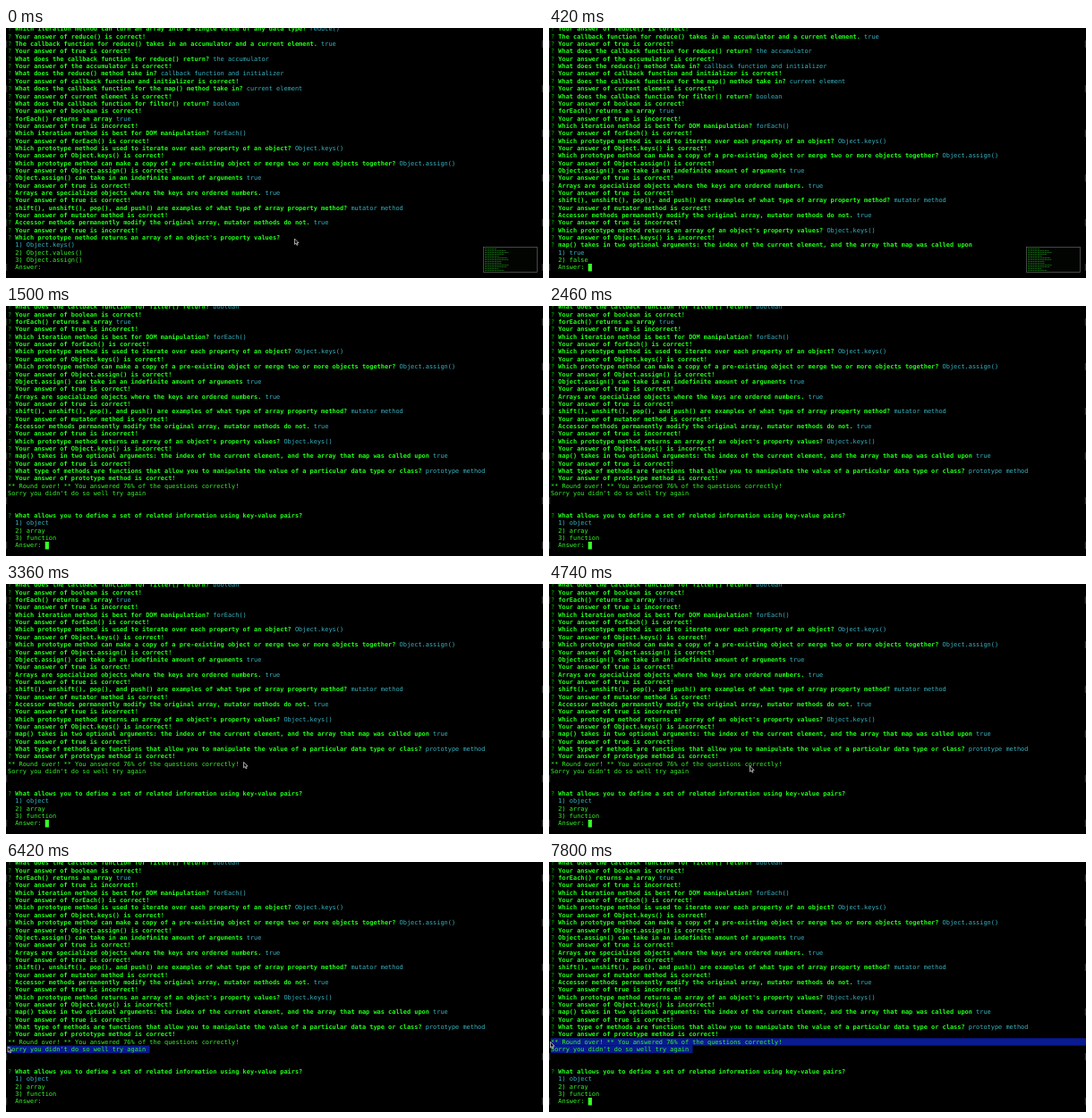
An HTML page for the animation above (7.86 s loop, 600x280 px).

```html
<!DOCTYPE html>
<html lang="en">
<head>
<meta charset="utf-8">
<title>Terminal quiz</title>
<style>
  html, body { margin: 0; width: 100%; height: 100%; overflow: hidden; background: #000; }
  svg { display: block; width: 600px; height: 280px; background: #000; }
  text {
    font: 6.93px "DejaVu Sans Mono", monospace;
    white-space: pre;
    text-rendering: geometricPrecision;
    fill: #36f52a;
  }
  .mark { fill: #00b400; }
  .bold { font-weight: bold; fill: #20ff18; }
  .cyan { fill: #38b4c2; }
</style>
</head>
<body>
<svg id="stage" viewBox="0 0 600 280">
  <g id="selection" fill="#0a1a90"></g>
  <path d="M0.7 14V280M599.3 14V280" stroke="#3c3c3c" stroke-dasharray="8 42"/>
  <g id="rows"></g>
  <rect id="block" width="4.2" height="8.5" fill="#38fe27"/>
  <g id="preview">
    <rect x="533.5" y="245.5" width="60" height="28" fill="#020402" stroke="#565a56" stroke-width="0.8"/>
    <g id="previewLines" stroke="#1c9a18" stroke-width="0.9" opacity="0.7"></g>
  </g>
  <path id="mouse" d="M0 0V6.4L1.5 5L2.5 7.3L3.6 6.8L2.6 4.6H4.6Z"
        fill="#111" stroke="#ddd" stroke-width="0.7" stroke-linejoin="round"/>
</svg>
<script>
const LOOP = 7860;
const CELL = 4.172, PITCH = 8.34, LEFT = 2, TOP = -2.9, ROWS = 33;
const $ = id => document.getElementById(id);

const quiz = [
  ["Which iteration method can turn an array into a single value of any data type?", "reduce()", true],
  ["The callback function for reduce() takes in an accumulator and a current element.", "true", true],
  ["What does the callback function for reduce() return?", "the accumulator", true],
  ["What does the reduce() method take in?", "callback function and initializer", true],
  ["What does the callback function for the map() method take in?", "current element", true],
  ["What does the callback function for filter() return?", "boolean", true],
  ["forEach() returns an array", "true", false],
  ["Which iteration method is best for DOM manipulation?", "forEach()", true],
  ["Which prototype method is used to iterate over each property of an object?", "Object.keys()", true],
  ["Which prototype method can make a copy of a pre-existing object or merge two or more objects together?", "Object.assign()", true],
  ["Object.assign() can take in an indefinite amount of arguments", "true", true],
  ["Arrays are specialized objects where the keys are ordered numbers.", "true", true],
  ["shift(), unshift(), pop(), and push() are examples of what type of array property method?", "mutator method", true],
  ["Accessor methods permanently modify the original array, mutator methods do not.", "true", false],
  ["Which prototype method returns an array of an object's property values?", "Object.keys()", false],
  ["map() takes in two optional arguments: the index of the current element, and the array that map was called upon", "true", true],
  ["What type of methods are functions that allow you to manipulate the value of a particular data type or class?", "prototype method", true],
  ["What allows you to define a set of related information using key-value pairs?"]
];

// A row is a list of [class, text] spans.
const ask = (question, answer = "") =>
  [["mark", "? "], ["bold", question + " "], ["cyan", answer]];
const plain = text => [["", text]];
const answered = ([question, answer, right]) => [
  ask(question, answer),
  ask(`Your answer of ${answer} is ${right ? "correct" : "incorrect"}!`)
];
const prompt = (index, options, typed = "") => [
  ask(quiz[index][0]),
  ...options.map((option, i) => [[i ? "" : "cyan", `  ${i + 1}) ${option}`]]),
  plain("  Answer: " + typed)
];
const history = count => quiz.slice(0, count).flatMap(answered);

const valueOptions = ["Object.keys()", "Object.values()", "Object.assign()"];
const boolOptions = ["true", "false"];
const methodOptions = ["prototype method", "iteration method", "mutator method"];
const summary = [
  plain("** Round over! ** You answered 76% of the questions correctly!"),
  plain("Sorry you didn't do so well try again"),
  plain(""), plain("")
];

const stages = [
  [0, [...history(14), ...prompt(14, valueOptions)]],
  [120, [...history(14), ...prompt(14, valueOptions, "1")]],
  [240, history(15)],
  [360, [...history(15), ...prompt(15, boolOptions)]],
  [660, [...history(15), ...prompt(15, boolOptions, "1")]],
  [780, history(16)],
  [900, [...history(16), ...prompt(16, methodOptions)]],
  [1140, [...history(16), ...prompt(16, methodOptions, "1")]],
  [1260, history(17)],
  [1380, [...history(17), ...summary, ...prompt(17, ["object", "array", "function"])]]
].map(([start, rows]) => ({ start, rows }));

let scrolled = 0;
for (const stage of stages) {
  scrolled = Math.max(scrolled, stage.rows.length - ROWS);
  stage.rows = stage.rows.slice(scrolled);
}

const rowTop = row => TOP + row * PITCH;
const rowLength = row => row.reduce((sum, span) => sum + span[1].length, 0);
const escapeText = text => text.replace(/&/g, "&amp;").replace(/</g, "&lt;");

function rowMarkup(row, i) {
  const spans = row.map(([name, text]) => `<tspan class="${name}">${escapeText(text)}</tspan>`).join("");
  return `<text x="${LEFT}" y="${rowTop(i) + 6.35}">${spans}</text>`;
}

// Pointer stops: time, x, y
const stops = [
  [0, 322.5, 236], [2500, 322.5, 236], [3000, 290, 212], [3360, 265.5, 199.5],
  [4300, 262, 200], [5500, 160, 210.5], [5900, 160, 211], [6000, 142.5, 211],
  [6350, 2, 206.7], [6480, 2, 206.7], [6680, 1.5, 202], [LOOP, 1.5, 201.5]
];

function pointer(t) {
  const next = Math.max(1, stops.findIndex(stop => stop[0] > t));
  const [t0, x0, y0] = stops[next - 1], [t1, x1, y1] = stops[next];
  const k = (t - t0) / (t1 - t0);
  return { x: x0 + (x1 - x0) * k, y: y0 + (y1 - y0) * k };
}

// The selection trails the pointer slightly.
function selectionMarkup(t) {
  if (t < 5900) return "";
  const anchor = { row: 25, x: LEFT + 38 * CELL };
  const { x, y } = pointer(t - 60);
  const startRow = Math.floor((y - TOP) / PITCH);
  const startX = LEFT + Math.max(0, Math.round((x - LEFT) / CELL)) * CELL;
  let markup = "";
  for (let row = startRow; row <= anchor.row; row++) {
    const from = row === startRow ? startX : LEFT;
    const to = row === anchor.row ? anchor.x : 600;
    markup += `<rect x="${from}" y="${rowTop(row)}" width="${Math.max(0, to - from)}" height="${PITCH}"/>`;
  }
  return markup;
}

$("previewLines").innerHTML = Array.from({ length: 13 }, (_, i) => {
  const width = 13 + 14 * Math.abs(Math.sin(i * 2.3));
  return `<path d="M535 ${247.5 + i * 2}h${width}" stroke-dasharray="2.2 0.5"/>`;
}).join("");

const show = (node, visible) => node.setAttribute("visibility", visible ? "visible" : "hidden");
const move = (node, x, y) => node.setAttribute("transform", `translate(${x} ${y})`);
let shown = null;

function draw(t) {
  const stage = stages.filter(s => s.start <= t).pop();
  if (stage !== shown) {
    $("rows").innerHTML = stage.rows.map(rowMarkup).join("");
    shown = stage;
  }

  const last = stage.rows.length - 1;
  move($("block"), LEFT + rowLength(stage.rows[last]) * CELL, rowTop(last));
  show($("block"), t >= 120 && (t < 1500 || (t + 66) % 1100 < 550));

  const { x, y } = pointer(t);
  move($("mouse"), x, y);
  show($("mouse"), t < 120 || t >= 2500);
  $("selection").innerHTML = selectionMarkup(t);

  const slide = Math.min(1, Math.max(0, (t - 780) / 240));
  move($("preview"), 70 * slide * slide, 0);
}

function tick(now) {
  draw(now % LOOP);
  requestAnimationFrame(tick);
}
draw(0);
requestAnimationFrame(tick);
</script>
</body>
</html>
```
